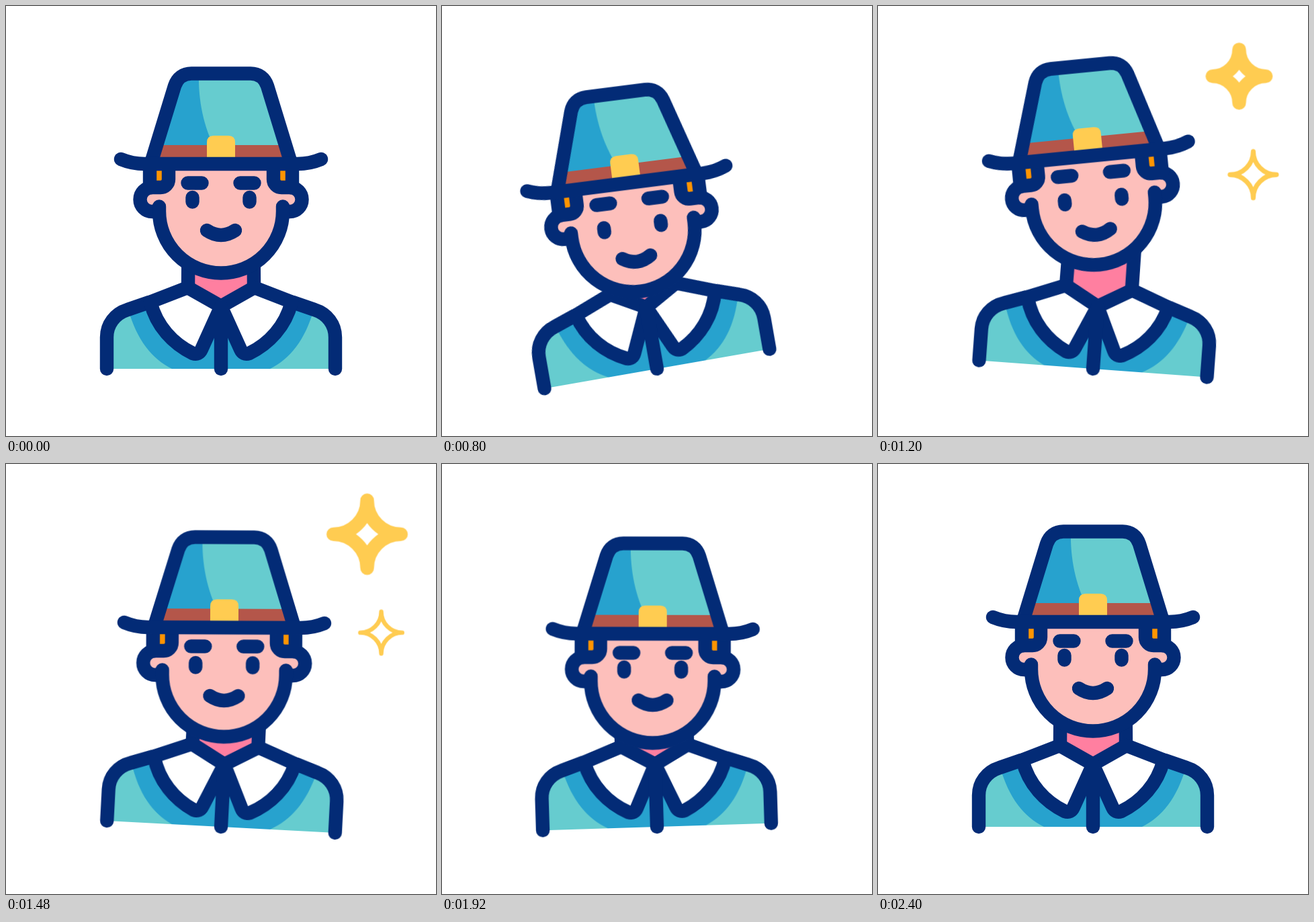
These frames come from a looping animation (640x640 px, 2600 ms). An HTML page:

```html
<!DOCTYPE html>
<html lang="en">
<head>
<meta charset="utf-8">
<title>Pilgrim</title>
<style>
html, body { margin: 0; width: 100%; height: 100%; overflow: hidden; background: #fff; }
svg { display: block; width: 100vw; height: 100vh; }

.line { fill: none; stroke: #032b76; stroke-width: 20.4; stroke-linecap: round; stroke-linejoin: round; }
.navy { stroke: #032b76; stroke-width: 20.4; stroke-linecap: round; stroke-linejoin: round; }
.teal { fill: #66cccf; }
.blue { fill: #27a2ce; }
.skin { fill: #fdbfbb; }
.gold { fill: #ffcc51; }

.body, .head, .face, .brows, .star { animation: 2600ms linear infinite; }

.body { transform-origin: 320px 540px; animation-name: sway; }
.head { transform-origin: 320px 400px; animation-name: nod; }
.face { --shift: 12px; animation-name: look; }
.brows { --shift: -1.7px; animation-name: look; }

@keyframes sway {
  0% { transform: rotate(0deg); }
  7.692% { transform: rotate(0deg); animation-timing-function: cubic-bezier(.167, .167, .667, 1); }
  30% { transform: rotate(-10deg); animation-timing-function: cubic-bezier(.333, 0, .5, 1); }
  50% { transform: rotate(5deg); animation-timing-function: cubic-bezier(.2, .1, .667, 1); }
  76.923% { transform: rotate(-2deg); animation-timing-function: cubic-bezier(.333, 0, .667, 1); }
  92.308%, 100% { transform: rotate(0deg); }
}
@keyframes nod {
  0% { transform: translate(0px, 0px) rotate(0deg); }
  7.692% { transform: translate(0px, 0px) rotate(0deg); animation-timing-function: cubic-bezier(.167, .167, .667, 1); }
  30% { transform: translate(-4px, 25px) rotate(2.7deg); animation-timing-function: cubic-bezier(.333, 0, .6, 1); }
  49.231% { transform: translate(-1px, -15px) rotate(-10.5deg); animation-timing-function: cubic-bezier(.167, .167, .667, 1); }
  66.154% { transform: translate(-4px, 25px) rotate(2.7deg); animation-timing-function: cubic-bezier(.333, .2, .667, 1); }
  92.308%, 100% { transform: translate(0px, 0px) rotate(0deg); }
}
@keyframes look {
  0% { transform: translateY(0px); }
  7.692% { transform: translateY(0px); animation-timing-function: cubic-bezier(.167, .167, .667, 1); }
  22.308% { transform: translateY(var(--shift)); }
  49.231% { transform: translateY(var(--shift)); animation-timing-function: cubic-bezier(.167, .167, .667, 1); }
  61.538%, 100% { transform: translateY(0px); }
}

.star { fill: none; stroke: #ffcc51; stroke-linejoin: round; vector-effect: non-scaling-stroke; }
.big { animation-name: growBig, thicken; }
.small { animation-name: growSmall, thicken; }
@keyframes growBig {
  0% { transform: scale(0); }
  32.308% { transform: scale(0); animation-timing-function: cubic-bezier(.333, 0, .667, 1); }
  53.077% { transform: scale(.535); animation-timing-function: cubic-bezier(.5, 0, .667, 1); }
  72.308%, 100% { transform: scale(0); }
}
@keyframes growSmall {
  0% { transform: scale(0); }
  30.769% { transform: scale(0); animation-timing-function: cubic-bezier(.333, 0, .55, 1); }
  50.769% { transform: scale(.38); animation-timing-function: cubic-bezier(.4, 0, .667, 1); }
  71.538%, 100% { transform: scale(0); }
}
@keyframes thicken {
  0%, 31% { stroke-width: 0px; }
  37%, 67% { stroke-width: 20.4px; }
  72%, 100% { stroke-width: 0px; }
}
</style>
</head>
<body>
<svg viewBox="0 0 640 640">
  <defs>
    <path id="astroid" d="M0-100A100 100 0 0 0 100 0A100 100 0 0 0 0 100A100 100 0 0 0-100 0A100 100 0 0 0 0-100Z"/>
    <g id="collar">
      <path class="line" d="M150 540V493C150 474 162 458 181 452L213 441"/>
      <path class="navy" fill="#fff" d="M215 440.5L270.5 419L320 447L291 511Q287 520 278 517C249 503 224 477 215 440.5Z"/>
    </g>
    <g id="side">
      <circle class="skin" cx="217.500" cy="288" r="18"/>
      <path class="line" d="M217.500 270A18 18 0 0 0 217.500 306H222"/>
      <path class="navy" fill="#ff9500" d="M214 238V270H230A12 12 0 0 0 242 258V238"/>
    </g>
  </defs>

  <g class="body">
    <path fill="#ff7fa0" d="M271 350H369V418L320 447L271 418Z"/>
    <path class="line" d="M271.500 350L271 418M368.500 350L369 418"/>
    <path class="teal" d="M150 540V493C150 474 162 458 181 452L271 420L320 447L369 420L459 452C478 458 490 474 490 493V540Z"/>
    <path class="blue" d="M182 452C195 497 217 525 247 540H393C423 525 445 497 458 452L369 420L320 447L271 420Z"/>
    <use href="#collar"/>
    <use href="#collar" transform="matrix(-1 0 0 1 640 0)"/>
    <path class="line" d="M320 447V540"/>

    <g class="head">
      <path class="skin" d="M228 235H412V305.500A92 92 0 0 1 228 305.500Z"/>
      <use href="#side"/>
      <use href="#side" transform="matrix(-1 0 0 1 640 0)"/>
      <path class="line" d="M228 298.500V305.500A92 92 0 0 0 412 305.500V298.500"/>
      <path class="line brows" d="M270.500 263.500H291.500M348.500 263.500H369.500"/>
      <path class="line face" d="M277.500 285V291.500M362.500 285V291.500M299 334Q320 348 341 334"/>

      <path class="teal" d="M219 225L251 119Q257 100 276 100H364Q383 100 389 119L421 225Z"/>
      <path class="blue" d="M287 100H276Q257 100 251 119L222 214H312C294 180 286 140 287 100Z"/>
      <path fill="#b4564a" d="M225 207H415L421 235H219Z"/>
      <path class="gold" d="M299 235V203Q299 193 309 193H331Q341 193 341 203V235Z"/>
      <path class="line" d="M217 230L251 119C255 107 264 100.500 276 100.500H364C376 100.500 385 107 389 119L423 230"/>
      <path class="line" d="M171 228Q188 235 206 235H434Q452 235 469 228"/>
    </g>
  </g>

  <g transform="translate(537.5 104.5)"><path class="star big" d="M0-100A100 100 0 0 0 100 0A100 100 0 0 0 0 100A100 100 0 0 0-100 0A100 100 0 0 0 0-100Z"/></g>
  <g transform="translate(558.5 251)"><use href="#astroid" class="star small"/></g>
</svg>
</body>
</html>
```
